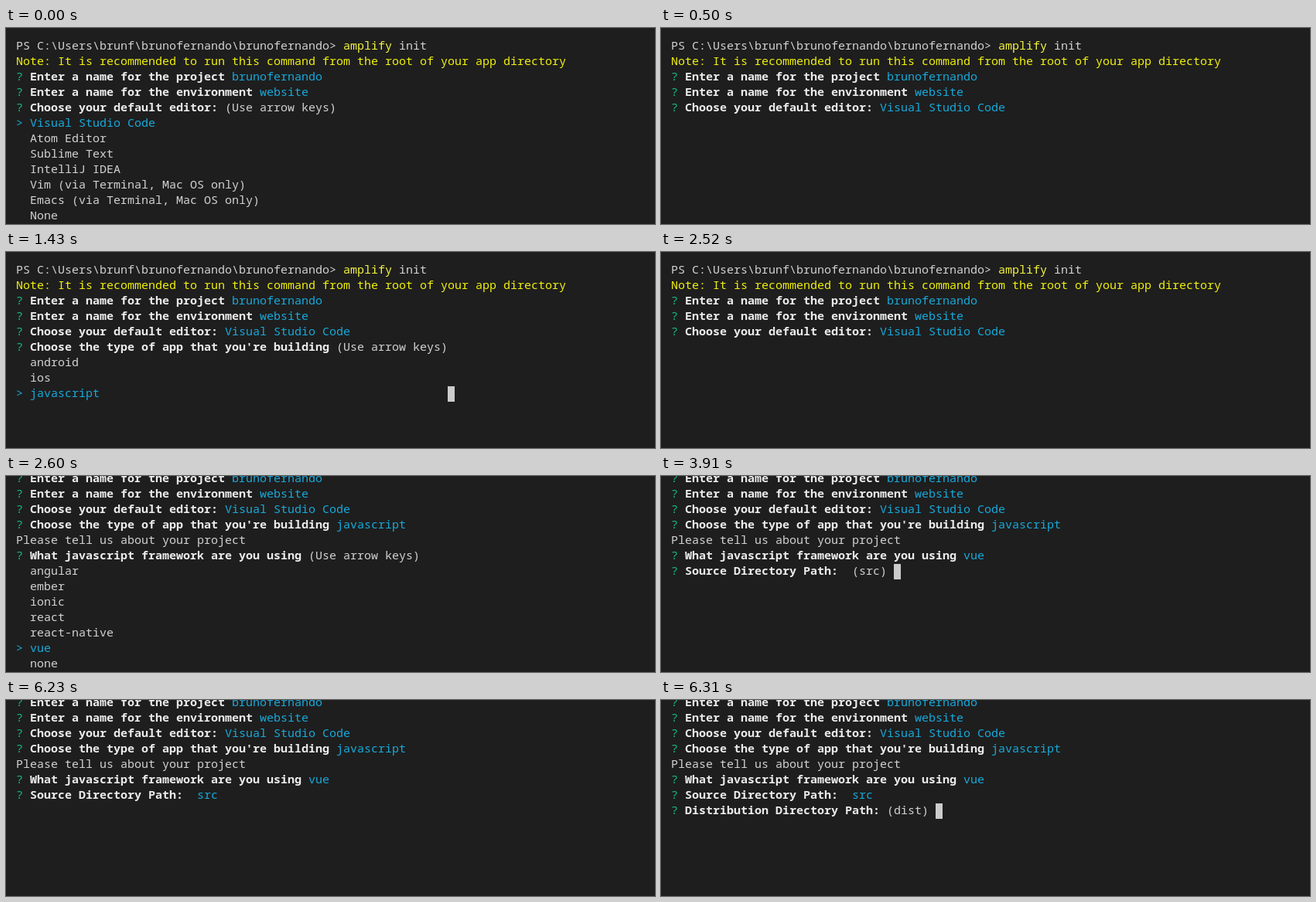
Write an HTML page that moves like this. It is 839 by 254 pixels and loops after 8000 ms.

```html
<!DOCTYPE html>
<html lang="en">
<head>
<meta charset="utf-8">
<title>amplify init</title>
<style>
  html, body { margin: 0; width: 100%; height: 100%; overflow: hidden; background: #1e1e1e; }
  svg { display: block; width: 839px; height: 254px; }
  text {
    font: 15px "Noto Sans Mono", "DejaVu Sans Mono", monospace;
    font-variant-ligatures: none;
    white-space: pre;
    fill: #d2d2d2;
  }
  .q { fill: #14bc7c; }
  .b { fill: #ececec; font-weight: 700; }
  .c { fill: #18a9da; }
  .note { fill: #f0f010; }
  .cmd { fill: #f5f543; }
  rect { fill: #ccc; }

  /* Kept at element level so the class rules can set the name. */
  g { animation: 8s step-end infinite; }
  .log { animation-name: scroll; }
  .editors { animation-name: editors; }
  .editor { animation-name: editor; }
  .type { animation-name: type; }
  .types { animation-name: types; }
  .project { animation-name: project; }
  .frameworks { animation-name: frameworks; }
  .path { animation-name: path; }
  .path-input { animation-name: path-input; }
  .path-done { animation-name: path-done; }
  .dist { animation-name: dist; }

  @keyframes scroll { 0% { transform: translateY(0); } 32.5%, 100% { transform: translateY(-60px); } }
  @keyframes editors { 0% { opacity: 1; } 6.25%, 100% { opacity: 0; } }
  @keyframes editor { 0% { opacity: 0; } 6.25%, 100% { opacity: 1; } }
  @keyframes type {
    0% { opacity: 0; } 17.875% { opacity: 1; }
    31.5% { opacity: 0; } 32.5%, 100% { opacity: 1; }
  }
  @keyframes types { 0% { opacity: 0; } 17.875% { opacity: 1; } 31.5%, 100% { opacity: 0; } }
  @keyframes project { 0% { opacity: 0; } 32.5%, 100% { opacity: 1; } }
  @keyframes frameworks { 0% { opacity: 0; } 32.5% { opacity: 1; } 48.875%, 100% { opacity: 0; } }
  @keyframes path { 0% { opacity: 0; } 48.875%, 100% { opacity: 1; } }
  @keyframes path-input { 0% { opacity: 0; } 48.875% { opacity: 1; } 77.875%, 100% { opacity: 0; } }
  @keyframes path-done { 0% { opacity: 0; } 77.875%, 100% { opacity: 1; } }
  @keyframes dist { 0% { opacity: 0; } 78.875%, 100% { opacity: 1; } }
</style>
</head>
<body>
<!-- Character cells are 9 x 20 px, starting at 13, 14. -->
<svg viewBox="0 0 839 254">
  <g class="log">
    <text x="13" y="28">PS C:\Users\brunf\brunofernando\brunofernando&gt; <tspan class="cmd">amplify</tspan> init</text>
    <text x="13" y="48" class="note">Note: It is recommended to run this command from the root of your app directory</text>
    <text x="13" y="68"><tspan class="q">? </tspan><tspan class="b">Enter a name for the project </tspan><tspan class="c">brunofernando</tspan></text>
    <text x="13" y="88"><tspan class="q">? </tspan><tspan class="b">Enter a name for the environment </tspan><tspan class="c">website</tspan></text>
    <text x="13" y="108"><tspan class="q">? </tspan><tspan class="b">Choose your default editor:</tspan></text>

    <g class="editors">
      <text x="283" y="108">(Use arrow keys)</text>
      <text x="13" y="128" class="c">&gt; Visual Studio Code</text>
      <text x="31" y="148">Atom Editor</text>
      <text x="31" y="168">Sublime Text</text>
      <text x="31" y="188">IntelliJ IDEA</text>
      <text x="31" y="208">Vim (via Terminal, Mac OS only)</text>
      <text x="31" y="228">Emacs (via Terminal, Mac OS only)</text>
      <text x="31" y="248">None</text>
    </g>
    <g class="editor">
      <text x="283" y="108" class="c">Visual Studio Code</text>
    </g>

    <g class="type">
      <text x="13" y="128"><tspan class="q">? </tspan><tspan class="b">Choose the type of app that you're building</tspan></text>
    </g>
    <g class="types">
      <text x="427" y="128">(Use arrow keys)</text>
      <text x="31" y="148">android</text>
      <text x="31" y="168">ios</text>
      <text x="13" y="188" class="c">&gt; javascript</text>
      <rect x="571" y="174" width="9" height="20"/>
    </g>

    <g class="project">
      <text x="427" y="128" class="c">javascript</text>
      <text x="13" y="148">Please tell us about your project</text>
      <text x="13" y="168"><tspan class="q">? </tspan><tspan class="b">What javascript framework are you using</tspan></text>
    </g>
    <g class="frameworks">
      <text x="391" y="168">(Use arrow keys)</text>
      <text x="31" y="188">angular</text>
      <text x="31" y="208">ember</text>
      <text x="31" y="228">ionic</text>
      <text x="31" y="248">react</text>
      <text x="31" y="268">react-native</text>
      <text x="13" y="288" class="c">&gt; vue</text>
      <text x="31" y="308">none</text>
    </g>

    <g class="path">
      <text x="391" y="168" class="c">vue</text>
      <text x="13" y="188"><tspan class="q">? </tspan><tspan class="b">Source Directory Path:</tspan></text>
    </g>
    <g class="path-input">
      <text x="247" y="188">(src)</text>
      <rect x="301" y="174" width="9" height="20"/>
    </g>
    <g class="path-done">
      <text x="247" y="188" class="c">src</text>
    </g>
    <g class="dist">
      <text x="13" y="208"><tspan class="q">? </tspan><tspan class="b">Distribution Directory Path:</tspan> (dist)</text>
      <rect x="355" y="194" width="9" height="20"/>
    </g>
  </g>
</svg>
</body>
</html>
```
